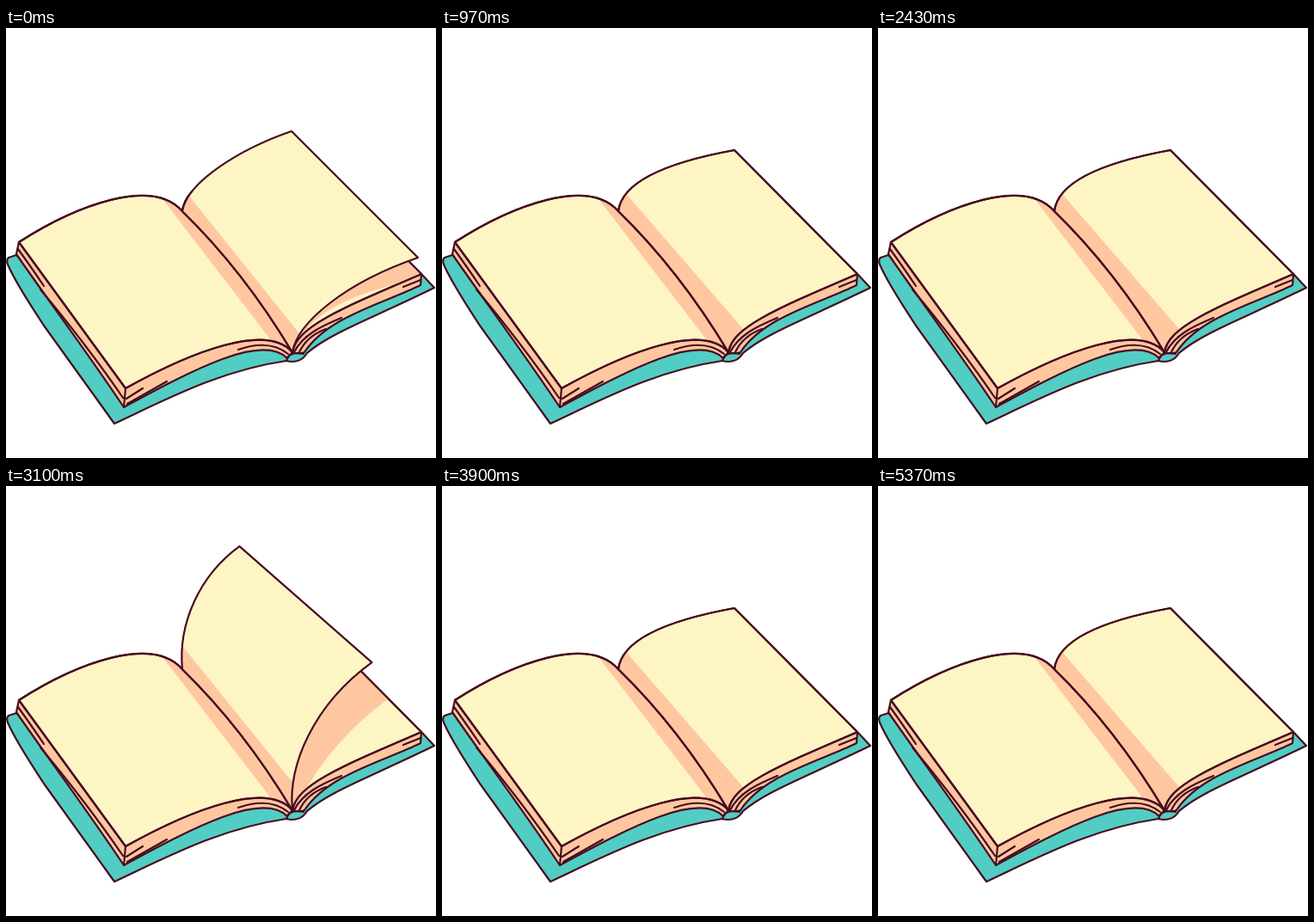
Animation, 500 px wide and 500 px high, one loop 5.83 s. Source, as an HTML page:

```html
<!DOCTYPE html>
<html lang="en">
<head>
<meta charset="utf-8">
<title>Turning pages</title>
<style>
  html, body { margin: 0; width: 100%; height: 100%; overflow: hidden; background: #fff; }
  svg { display: block; width: 100%; height: 100%; }
  path { fill: none; }
  .ink { stroke: #470c20; stroke-width: 2.2; stroke-linecap: round; stroke-linejoin: round; }
  .cream { fill: #fef5c4; }
  .salmon { fill: #ffc7a0; }
  .teal { fill: #51cdc4; }
</style>
</head>
<body>
<svg viewBox="0 0 500 500">
  <defs>
    <clipPath id="leftClip"><path id="leftShape"/></clipPath>
    <clipPath id="rightClip"><path id="rightShape"/></clipPath>
  </defs>

  <!-- cover -->
  <path class="ink teal" d="M12 264 L3 267 Q0 269 2 275 C12 298 28 321 44 346 C66 376 95 417 126 460
    C190 430 250 398 326 387 C338 390 346 385 350 378 C378 354 425 338 498 302 L483 286 L333 300 L139 350 Z"/>

  <!-- page blocks -->
  <path class="ink salmon" d="M15 249 L12 263 C50 318 95 378 137 441 C220 396 298 355 327 384 L333 377 L205 213 Z"/>
  <path class="ink salmon" d="M483 286 L482 299 C440 320 375 335 347 377 Q340 380 333 377 L350 320 Z"/>

  <g id="leftPage"></g>
  <path id="leftCast" class="salmon" clip-path="url(#leftClip)"/>
  <g id="rightPage"></g>
  <path id="rightCast" class="salmon" clip-path="url(#rightClip)"/>
  <path class="ink" id="pageLines"/>

  <!-- loose sheet lines -->
  <path class="ink" d="M14 257 Q32 282 44 300 M40 304 Q95 370 136 430
    M139 419 L137 441 M140 431 L159 419 M141 437 L187 411
    M270 374 C293 366 313 367 328 379 M335 377 C345 357 366 347 390 337 M341 377 Q350 358 372 350
    M462 301 L482 293 M326 387 L328 382 Q335 376 346 379"/>

  <g id="turning"></g>
</svg>
<script>
const LOOP = 5830, CYCLE = 1460, HOLD = 80, LAST = 12;
const TOP = [205, 213], FOOT = [333, 377];

const $ = id => document.getElementById(id);
const mix = (a, b, t) => a.map((v, i) => v + (b[i] - v) * t);
const add = (a, b, k = 1) => a.map((v, i) => v + b[i] * k);
const xy = (...pts) => pts.flat().map(v => v.toFixed(1)).join(" ");
const SPINE = `Q276 282 ${xy(TOP)} Z`;

// A page at rest: its far and near edges, each a cubic leaving the spine
const LEFT = { far: [TOP, [170, 173], [82, 206], [15, 249]], near: [FOOT, [303, 343], [218, 375], [139, 419]] };
const RIGHT = { far: [TOP, [210, 172], [285, 152], [340, 142]], near: [FOOT, [338, 348], [385, 328], [483, 286]] };

// Key poses of the turning leaf: rise is the bend at the spine, curl the bend at the corners
const KEYS = [
  { at: 0, far: [332, 120], near: [479, 267], rise: [6, -35], curl: [-58, 20] },
  { at: 3, far: [238, 48], near: [392, 178], rise: [-10, -58], curl: [-37, 42] },
  { at: 4, far: [187, 40], near: [323, 171], rise: [-12, -48], curl: [-2, 54] },
  { at: 6, far: [90, 84], near: [182, 197], rise: [-30, -42], curl: [18, 30] },
  { at: 8, far: [39, 150], near: [145, 290], rise: [-49, -57], curl: [30, 24] },
  { at: LAST, far: [15, 249], near: [139, 419], rise: [-32, -38], curl: [58, -33] }
];

// Smooth curve through the key poses
function ease(name, pose) {
  const i = Math.max(0, KEYS.findIndex(k => k.at > pose) - 1);
  const a = KEYS[i], b = KEYS[i + 1], before = KEYS[i - 1] || a, after = KEYS[i + 2] || b;
  const span = b.at - a.at, t = (pose - a.at) / span;
  const slope = (p, q, j) => (q[name][j] - p[name][j]) / (q.at - p.at) * span;
  return a[name].map((v, j) =>
    v + (b[name][j] - v) * t * t * (3 - 2 * t) +
    slope(before, b, j) * t * (1 - t) ** 2 - slope(a, after, j) * t * t * (1 - t));
}

function leafAt(pose) {
  const [far, near, rise, curl] = ["far", "near", "rise", "curl"].map(n => ease(n, pose));
  return {
    far: [TOP, add(TOP, rise), add(far, curl), far],
    near: [FOOT, add(FOOT, rise), add(near, curl, 1.45), near],
    sag: pose > 4 ? 9 * Math.sin(Math.PI * (pose - 4) / 8) : 0,
    reach: .17 + .15 * Math.exp(-(((pose - 8) / 2.5) ** 2))
  };
}

// First part of a cubic, up to t
function cut([p, q, r, s], t) {
  const a = mix(p, q, t), b = mix(q, r, t), c = mix(r, s, t);
  const ab = mix(a, b, t), bc = mix(b, c, t);
  return [p, a, ab, mix(ab, bc, t)];
}

const outline = (far, near, sag = 0) =>
  `M${xy(far[0])} C${xy(far[1], far[2], far[3])} ` +
  `Q${xy(add(mix(far[3], near[3], .5), [-sag, sag]), near[3])} ` +
  `C${xy(near[2], near[1], near[0])} ${SPINE}`;

const body = page => outline(page.far, page.near, page.sag);
const shade = ({ far, near, reach = .18 }, extra = 0) =>
  outline(cut(far, reach), cut(near, reach + .02 + extra));

const draw = (page, fill = "cream", extra = 0) =>
  `<path class="${fill}" d="${body(page)}"/><path class="salmon" d="${shade(page, extra)}"/>` +
  `<path class="ink" d="${body(page)}"/>`;

// Shadow on the right page draws back to the spine as the leaf lifts
function rightCast(pose) {
  if (pose > 6) return "";
  const top = cut(RIGHT.far, 1 - .003 * pose ** 3);
  const tip = [490 - 6.3 * pose ** 2, 290 - 80 * Math.sin(Math.PI * pose / 8)];
  const end = [352, 347];
  const bow = add(mix(tip, end, .5), [-8 * Math.max(0, 4 - pose), -10]);
  return `M${xy(TOP)} C${xy(top[1], top[2], top[3])} L${xy(tip)} Q${xy(bow, end)} L${xy(FOOT)} ${SPINE}`;
}

// Shadow on the left page runs ahead of the leaf as it comes down
function leftCast(pose, leaf) {
  if (pose < 6 || pose === LAST) return "";
  const lead = pose - 6.6, end = [305, 366];
  const tip = add(leaf.near[3], [19, 11], lead);
  const bow = add(mix(tip, end, .5), [-28, 22 * (pose - 7)]);
  return `M${xy(TOP)} L${xy(tip)} Q${xy(bow, end)} L${xy(FOOT)} ${SPINE}`;
}

// Poses start on a 30 fps grid
const startOf = (turn, pose) =>
  Math.round(Math.ceil((turn * CYCLE + pose * HOLD) * .03 - 1e-6) / .3) * 10;

function poseAt(ms) {
  let pose = LAST;
  for (let turn = 0; turn < 4; turn++)
    for (let k = 0; k <= LAST; k++)
      if (startOf(turn, k) <= ms) pose = k;
  return pose;
}

$("leftPage").innerHTML = draw(LEFT);
$("rightPage").innerHTML = draw(RIGHT, "cream", .12);
$("leftShape").setAttribute("d", body(LEFT));
$("rightShape").setAttribute("d", body(RIGHT));
$("pageLines").setAttribute("d", body(LEFT) + body(RIGHT));

let shown = -1;
function render(ms) {
  const pose = poseAt(ms % LOOP);
  if (pose === shown) return;
  shown = pose;
  const leaf = pose < LAST ? leafAt(pose) : null;
  $("leftCast").setAttribute("d", leftCast(pose, leaf));
  $("rightCast").setAttribute("d", rightCast(pose));
  $("turning").innerHTML = leaf ? draw(leaf, pose === 6 ? "salmon" : "cream") : "";
}

const begin = performance.now();
function tick() {
  render(performance.now() - begin);
  requestAnimationFrame(tick);
}
tick();
</script>
</body>
</html>
```
